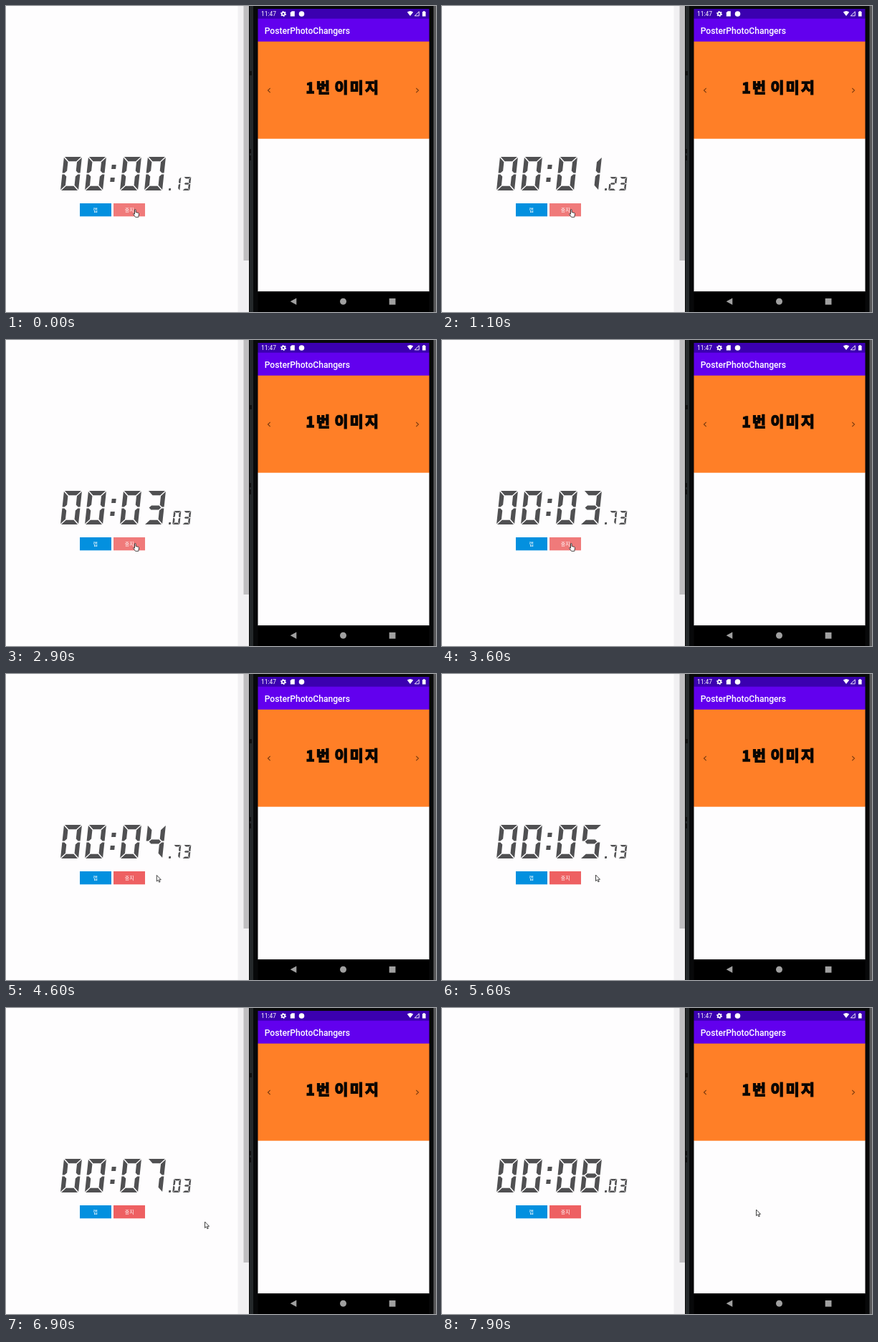
These frames come from a looping animation (600x428 px, 8 s). An HTML page:

```html
<!DOCTYPE html>
<html lang="ko">
<head>
<meta charset="utf-8">
<style>
  html, body { margin: 0; width: 100%; height: 100%; overflow: hidden; background: #fefdfe; }
  svg { display: block; width: 600px; height: 428px; }
  .ko { font-family: "Noto Sans CJK KR", "Noto Sans CJK", sans-serif; }
  .ui { font-family: Roboto, sans-serif; fill: #fff; }
  .label { font-size: 7px; fill: #fff; text-anchor: middle; }
  .banner { font-size: 20.5px; font-weight: 900; letter-spacing: 2.4px; fill: #0b0704; stroke: #0b0704; stroke-width: 1.5; }
  .chevron { fill: none; stroke: #7d3c10; stroke-width: 1.2; }
  .cursor { fill: #fff; stroke: #333; stroke-width: .9; stroke-linejoin: round; }
</style>
</head>
<body>
<svg viewBox="0 0 600 428">
  <rect width="600" height="428" fill="#fefdfe"/>

  <!-- stopwatch -->
  <g id="clock" fill="#505052">
    <path d="M147.7 222h6l-.6 6h-6zM145.8 240h6l-.6 6h-6zM227.3 255h2.8l-.3 3h-2.8z"/>
  </g>
  <rect x="103" y="276" width="44" height="18.3" fill="#0390df"/>
  <rect id="stop" x="150" y="276" width="44" height="18.3"/>
  <text class="ko label" x="124.8" y="287.7">랩</text>
  <text class="ko label" x="172.2" y="287.7">중지</text>

  <!-- scroll bar -->
  <rect x="323.5" width="16.5" height="428" fill="#f1f0f2"/>
  <rect x="331.5" width="7.5" height="356" fill="#bfbec0"/>

  <!-- phone -->
  <rect x="339" width="261" height="428" fill="#08090a"/>
  <rect x="340" width="5" height="428" fill="#25292b"/>
  <rect x="596.5" width="3.5" height="428" fill="#58585a"/>
  <path d="M340 91h3v6h-3zM340 200h2v6h-2zM340 209h2v7h-2z" fill="#111"/>
  <g transform="translate(351.5)">
    <rect y="4" width="239" height="14" fill="#3b00b0"/>
    <rect y="17.7" width="239" height="32.3" fill="#6200ee"/>
    <rect y="49.7" width="239" height="136.3" fill="#ff7f27"/>
    <rect y="185.7" width="239" height="213.7" fill="#fefdfe"/>
    <rect y="399.4" width="239" height="28.6" fill="#000"/>
  </g>

  <text class="ui" x="356" y="14" font-size="8.4">11:47</text>
  <circle cx="387" cy="11" r="2.2" fill="none" stroke="#fff" stroke-width="1.7"/>
  <circle cx="387" cy="11" r="3.4" fill="none" stroke="#fff" stroke-width="1.2" stroke-dasharray="1.78"/>
  <path d="M398.8 7.2h4v7.4h-6V9.2z" fill="#fff"/>
  <circle cx="412.5" cy="11" r="3.8" fill="#fff"/>
  <path d="M559.8 8.6q4.2-3.2 8.4 0L564 14zM581 8h1.3V7h2v1h1.3v6.5H581z" fill="#fff"/>
  <path d="M576.3 7.8v6h-6z" fill="none" stroke="#fff" stroke-width=".9"/>
  <text class="ui" x="360.7" y="38.5" font-size="12.1" font-weight="500">PosterPhotoChangers</text>

  <text class="ko banner" y="122"><tspan x="418.5">1번</tspan><tspan x="458.5">이미지</tspan></text>
  <path class="chevron" d="M368.7 114.8l-3.2 3.2 3.2 3.2M572.3 114.8l3.2 3.2-3.2 3.2"/>

  <path d="M405.3 408.5v9.6l-8.6-4.8zM534.7 409h8.8v8.8h-8.8z" fill="#a0a0a0"/>
  <circle cx="470.5" cy="413.3" r="4.5" fill="#a0a0a0"/>

  <path id="arrow" class="cursor" d="M.5 0v8.6l2-1.8 1.4 3 1.4-.6-1.4-2.9h2.6z"/>
  <path id="hand" class="cursor" d="M-.8.4q.8-.8 1.6 0v3.6l3.6.9q.9.3.8 1.4l-.7 4.5h-4.2l-2.7-3.6q-.5-1.3.4-1.4l1.2.9z"/>
</svg>
<script>
const $ = id => document.getElementById(id);
const LOOP = 8000, STEP = 100, CLOCK_START = 130;

// Seven-segment digits: width, height, bar thickness, gap and slant.
const W = 25, H = 47, T = 6.2, G = 1, SLANT = .106, MID = H / 2;
const flipX = pts => pts.map(([x, y]) => [W - x, y]);
const flipY = pts => pts.map(([x, y]) => [x, H - y]);

const f = [[0, G], [T, T + G], [T, MID - T / 2 - G], [T / 2, MID - G], [0, MID - G]];
const a = [[G, 0], [W - G, 0], [W - G - T, T], [G + T, T]];
const gLeft = [[T + G, MID + T / 2], [T / 2 + G, MID], [T + G, MID - T / 2]];
const g = [...gLeft, ...flipX(gLeft).reverse()];
const segments = { a, b: flipX(f), c: flipX(flipY(f)), d: flipY(a), e: flipY(f), f, g };

const shapes = 'abcdef bc abged abgcd fgbc afgcd afgedc abc abcdefg abcdfg'.split(' ')
  .map(lit => [...lit].map(k => `M${segments[k].join('L')}z`).join(''));

function addDigit(x, y, scale) {
  const path = document.createElementNS('http://www.w3.org/2000/svg', 'path');
  path.setAttribute('transform',
    `translate(${x} ${y}) scale(${scale}) matrix(1 0 ${-SLANT} 1 ${SLANT * H} 0)`);
  return $('clock').appendChild(path);
}
const digits = [];
for (let i = 0; i < 4; i++) digits.push(addDigit(76 + 34 * i - (i > 1 ? -15 : 0), 211, 1));
for (let i = 0; i < 2; i++) digits.push(addDigit(232.2 + 14 * i, 239, .405));

// The pointer rests at each stop until the next move begins.
const rest = [180.3, 284.5];
const moves = [
  { start: 3900, end: 4700, to: [214, 281] },
  { start: 6300, end: 6900, to: [277, 299] },
  { start: 6900, end: 7200, to: [438, 282] }
];
function pointerAt(t) {
  return moves.reduce((from, { start, end, to }) => {
    const p = Math.min(1, Math.max(0, (t - start) / (end - start)));
    return from.map((v, i) => v + (to[i] - v) * p);
  }, rest);
}

function draw(t) {
  const count = String((t + CLOCK_START) / 10).padStart(digits.length, '0');
  digits.forEach((path, i) => path.setAttribute('d', shapes[count[i]]));

  const [x, y] = pointerAt(t), hover = x < 194;
  $('stop').setAttribute('fill', hover ? '#f07a7a' : '#ee6062');
  for (const id of ['arrow', 'hand']) {
    $(id).setAttribute('transform', `translate(${x} ${y})`);
    $(id).setAttribute('display', (id === 'hand') === hover ? 'inline' : 'none');
  }
}

const begin = performance.now();
function tick() {
  draw(Math.floor((performance.now() - begin) % LOOP / STEP) * STEP);
  requestAnimationFrame(tick);
}
tick();
</script>
</body>
</html>
```
